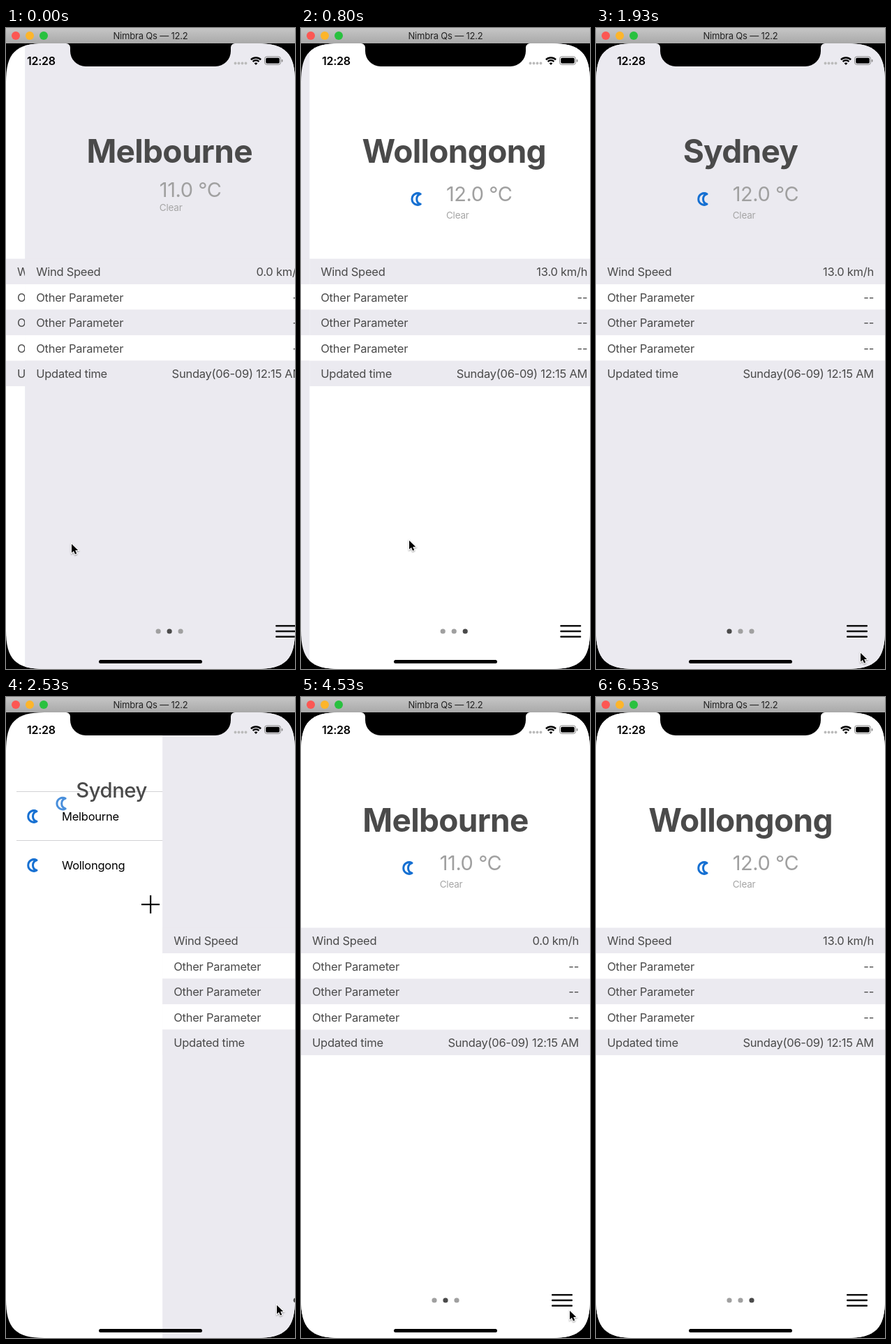
These frames come from a looping animation (414x918 px, 6.59 s). An HTML page with a canvas:

```html
<!DOCTYPE html>
<html lang="en">
<head>
<meta charset="utf-8">
<title>Weather pages</title>
<style>
  html, body { margin: 0; width: 100%; height: 100%; overflow: hidden; background: #000; }
  canvas { display: block; }
</style>
</head>
<body>
<canvas id="stage" width="414" height="918"></canvas>
<script>
const ctx = document.getElementById('stage').getContext('2d');
const LOOP = 6590, W = 414;
const GREY = '#ebeaf0', INK = '#4a4a4a', BLUE = '#1670d2';
const CITIES = [
  { name: 'Sydney', temp: '12.0 °C', wind: '13.0 km/h' },
  { name: 'Melbourne', temp: '11.0 °C', wind: '0.0 km/h' },
  { name: 'Wollongong', temp: '12.0 °C', wind: '13.0 km/h' }
];
const MOON = new Path2D('M6-7.3A8.3 8.3 0 1 0 6 7.3A7.6 7.6 0 0 1 6-7.3Z');
const ARROW = new Path2D('M0 0V12.6L3 9.9L5 14.6L7.2 13.7L5.2 9.1H9.2Z');
const NOTCH = new Path2D('M86 22A6 6 0 0 1 92 28V33A22 22 0 0 0 114 55H300A22 22 0 0 0 322 33V28A6 6 0 0 1 328 22Z');
const SCREEN = new Path2D('M0 77C0 36 14 22 55 22H359C400 22 414 36 414 77V863C414 904 400 918 359 918H55C14 918 0 904 0 863Z');

const clamp = v => Math.max(0, Math.min(1, v));
const mix = (a, b, p) => a + (b - a) * p;
const smooth = u => u * u * (3 - 2 * u);
const easeOut = u => 1 - (1 - u) ** 2;
const since = (t, start, length) => clamp((t - start) / length);

function setFont(size, weight = 400) {
  ctx.font = `${weight} ${size}px Inter, "Liberation Sans", sans-serif`;
  ctx.letterSpacing = -0.015 * size + 'px';
}

function widthOf(str, size) {
  setFont(size);
  return ctx.measureText(str).width;
}

// y is the middle of the capital letters
function text(str, x, y, size, color, align = 'left', weight = 400) {
  setFont(size, weight);
  ctx.textAlign = align;
  ctx.fillStyle = color;
  ctx.fillText(str, x, y + size * 0.364);
}

function rect(x, y, w, h, color) {
  ctx.fillStyle = color;
  ctx.fillRect(x, y, w, h);
}

function pill(x, y, w, h, r, color) {
  ctx.fillStyle = color;
  ctx.beginPath();
  ctx.roundRect(x, y, w, h, r);
  ctx.fill();
}

function disc(x, y, r, color) {
  pill(x - r, y - r, 2 * r, 2 * r, r, color);
}

function moon(x, y, alpha = 1) {
  ctx.save();
  ctx.translate(x, y);
  ctx.globalAlpha *= alpha;
  ctx.strokeStyle = BLUE;
  ctx.lineWidth = 3;
  ctx.lineJoin = 'round';
  ctx.stroke(MOON);
  ctx.restore();
}

// Places of the shared parts of a city in the list and on its page
function listPose(i) {
  const { name, temp } = CITIES[i], y = 101 + 70 * i;
  return {
    title: [80 + widthOf(name, 16.5) / 2, y, 16.5, 400, 0],
    moon: [38, y],
    temp: [404 - widthOf(temp, 16.5) / 2, y, 16.5, 400, 0]
  };
}

function pagePose() {
  return {
    title: [207, 176.5, 46, 700, 74],
    moon: [153, 245],
    temp: [243, 237, 29, 400, 160]
  };
}

function label(str, [x, y, size, weight, shade]) {
  const g = Math.round(shade);
  text(str, x, y, size, `rgb(${g},${g},${g})`, 'center', Math.round(weight));
}

function hero(i, from, to, p, withTemp) {
  const blend = (part, power) => from[part].map((v, k) => mix(v, to[part][k], p ** power));
  const title = blend('title', 1);
  if (p < 1) title[4] = 74;
  label(CITIES[i].name, title);
  moon(...blend('moon', 0.78), 1 - 0.9 * p * (1 - p));
  if (withTemp) label(CITIES[i].temp, blend('temp', 0.92));
}

function page(i, { x = 0, grey = false, bare = false, alpha = 1, parts = 'title moon temp' }) {
  const city = CITIES[i], pose = pagePose();
  if (bare) pose.temp.splice(0, 2, 237, 231);
  ctx.save();
  ctx.globalAlpha = alpha;
  ctx.translate(x, 0);
  rect(0, 22, W, 896, grey ? GREY : '#fff');
  const rows = [['Wind Speed', city.wind], ...Array(3).fill(['Other Parameter', '--']),
    ['Updated time', 'Sunday(06-09) 12:15 AM']];
  rows.forEach(([key, value], n) => {
    rect(0, 330.5 + 36.5 * n, W, 36.5, n % 2 ? '#fff' : GREY);
    text(key, 16, 349 + 36.5 * n, 16.5, INK);
    text(value, 398, 349 + 36.5 * n, 16.5, INK, 'right');
  });
  if (parts.includes('title')) label(city.name, pose.title);
  if (parts.includes('moon') && !bare) moon(...pose.moon);
  if (parts.includes('temp')) label(city.temp, pose.temp);
  text('Clear', pose.temp[0] - widthOf(city.temp, 29) / 2, bare ? 257.5 : 268.5, 13.5, '#a5a5a5');
  for (let n = 0; n < 3; n++) {
    disc(191 + 16 * n, 864, 3.6, n === i ? INK : '#a0a0a0');
    pill(359, 855 + 7.7 * n, 30, 2.6, 1, '#111');
  }
  ctx.restore();
}

function list(hidden, selected = false) {
  rect(0, 22, W, 896, '#fff');
  if (selected) rect(0, 66 + 70 * hidden, W, 70, '#d0d0d0');
  else for (const y of [135, 205]) rect(15, y, W, 1, '#d2d2d4');
  CITIES.forEach((city, i) => {
    if (i === hidden) return;
    const pose = listPose(i);
    label(city.name, pose.title);
    moon(...pose.moon);
    label(city.temp, pose.temp);
  });
  rect(194, 296, 26, 2.2, '#000');
  rect(206, 284, 2.2, 26, '#000');
}

function slideOut(i, p) {
  list(i);
  page(i, { x: W * p ** 1.08, grey: true, parts: 'temp' });
  hero(i, pagePose(), listPose(i), p, p === 1);
}

function openCity(i, p) {
  list(i, true);
  page(i, { alpha: p, parts: '' });
  hero(i, listPose(i), pagePose(), p, true);
}

function closeCity(i, p) {
  list(i);
  page(i, { alpha: 1 - p, parts: '' });
  hero(i, pagePose(), listPose(i), p, true);
}

function scene(t) {
  const swipe = start => W * (1 - smooth(since(t, start, 525)));
  const fade = start => easeOut(since(t, start, 520));
  if (t < 330) {
    page(0, {});
    page(1, { x: swipe(-442), grey: true, bare: true });
  } else if (t < 1120) {
    page(1, { grey: true, bare: true });
    page(2, { x: swipe(330) });
  } else if (t < 2326) {
    page(2, {});
    page(0, { x: swipe(1120), grey: true });
  } else if (t < 3500) slideOut(0, easeOut(since(t, 2326, 600)));
  else if (t < 4690) openCity(1, fade(3500));
  else if (t < 5750) closeCity(1, fade(4690));
  else openCity(2, fade(5750));
}

function statusBar() {
  ctx.fillStyle = '#000';
  ctx.fill(NOTCH);
  text('12:28', 30, 47, 16, '#000', 'left', 600);
  for (let n = 0; n < 4; n++) disc(328.5 + 5 * n, 50.5, 1.9, '#bbb');
  // wifi
  ctx.strokeStyle = '#000';
  ctx.lineWidth = 2.4;
  for (const r of [10, 6.2]) {
    ctx.beginPath();
    ctx.arc(358, 52.5, r, -Math.PI * 0.75, -Math.PI * 0.25);
    ctx.stroke();
  }
  ctx.fillStyle = '#000';
  ctx.fill(new Path2D('M358 53L355.6 50.4Q358 48.4 360.4 50.4Z'));
  // battery
  ctx.strokeStyle = '#888';
  ctx.lineWidth = 1;
  ctx.beginPath();
  ctx.roundRect(370.5, 41, 23, 11.5, 3.3);
  ctx.stroke();
  pill(372.2, 42.7, 19.6, 8.1, 1.8, '#000');
  pill(394.8, 45, 1.6, 3.8, 0.8, '#888');
  pill(133, 905, 148, 5, 2.5, '#000');
}

function titleBar() {
  const shade = ctx.createLinearGradient(0, 0, 0, 22);
  shade.addColorStop(0, '#c6c6c6');
  shade.addColorStop(1, '#a9a9a9');
  rect(0, 0, W, 22, shade);
  ['#fc5753', '#fdb52b', '#29c13f'].forEach((c, n) => disc(14 + 20 * n, 11, 6, c));
  text('Nimbra Qs — 12.2', 207, 11.5, 13, '#222', 'center');
}

const TRAIL = [
  [0, 94, 739], [250, 330, 715], [330, 345, 715], [760, 155, 734], [800, 155, 734],
  [1050, 340, 720], [1130, 350, 720], [1500, 130, 740], [1930, 379, 895],
  [2300, 380, 866], [2530, 388, 871], [2750, 380, 850], [3330, 185, 145],
  [3600, 185, 145], [4150, 157, 252], [4530, 385, 879], [4680, 380, 866],
  [4900, 378, 862], [5470, 262, 298], [5730, 220, 240], [6050, 222, 250], [6480, 330, 925]
];

function cursor(t) {
  const next = TRAIL.findIndex(key => key[0] > t);
  if (next < 0) return;
  const [t0, x0, y0] = TRAIL[next - 1], [t1, x1, y1] = TRAIL[next];
  const p = smooth((t - t0) / (t1 - t0));
  ctx.save();
  ctx.translate(mix(x0, x1, p), mix(y0, y1, p));
  ctx.strokeStyle = '#fff';
  ctx.lineWidth = 2;
  ctx.shadowColor = 'rgba(0,0,0,.4)';
  ctx.shadowBlur = 2;
  ctx.shadowOffsetY = 1;
  ctx.stroke(ARROW);
  ctx.shadowColor = 'transparent';
  ctx.fillStyle = '#000';
  ctx.fill(ARROW);
  ctx.restore();
}

function draw(now) {
  const t = now % LOOP;
  rect(0, 0, W, 918, '#000');
  ctx.save();
  ctx.clip(SCREEN);
  scene(t);
  ctx.restore();
  statusBar();
  titleBar();
  cursor(t);
}

const begin = performance.now();
function tick() {
  draw(performance.now() - begin);
  requestAnimationFrame(tick);
}
tick();
</script>
</body>
</html>
```
